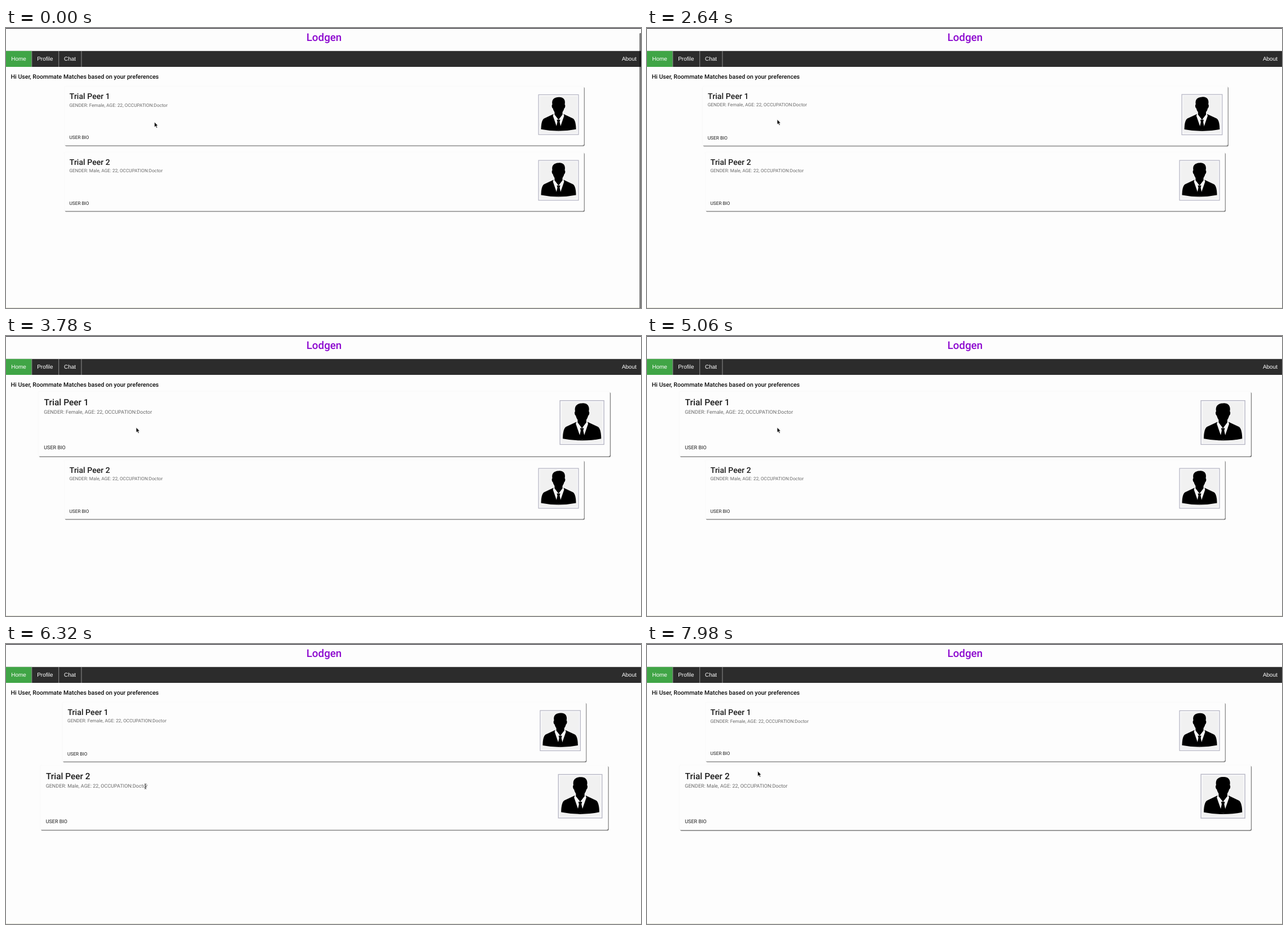
An HTML page for the animation above (8 s loop, 1128 px wide and 497 px high).

```html
<!DOCTYPE html>
<html lang="en">
<head>
<meta charset="utf-8">
<title>Roommate matches</title>
<style>
  html, body { margin: 0; width: 100%; height: 100%; overflow: hidden; background: #fdfdfd; }
  svg { display: block; width: 1128px; height: 497px; }
  text { font-family: Roboto, sans-serif; text-rendering: geometricPrecision; white-space: pre; }
  .brand { font-size: 18.8px; font-weight: 500; fill: #8c08cf; text-anchor: middle; }
  .nav text { font: 9.99px "Liberation Sans", Arial, sans-serif; fill: #fff; }
  .greeting { font-size: 10.58px; font-weight: 500; fill: #0c0c0c; }
  .name { font-size: 14.1px; font-weight: 500; fill: #1c1c1c; }
  .facts { font-size: 8.22px; fill: #6a6a6a; }
  .bio { font-size: 8.22px; fill: #1c1c1c; }
</style>
</head>
<body>
<svg viewBox="0 0 1128 497">
  <defs>
    <filter id="soft" x="-2%" y="-5%" width="104%" height="112%"><feGaussianBlur stdDeviation=".6"/></filter>
    <g id="avatar">
      <rect x="-35.5" y="-35.4" width="71" height="70.8" fill="#f8f8fa" stroke="#b4b4c2" stroke-width="1.2"/>
      <rect x="-33" y="-33" width="66" height="66" fill="#f1f1f1"/>
      <path d="M-9-1L-26 7C-30 10-31 19-31 26Q-16 29 0 29Q16 29 31 26C31 19 30 10 26 7L9-1Z"/>
      <path d="M-8-3L-10 2L-1 28H1L10 2L8-3L0 9Z" fill="#f6f6f6"/>
      <path d="M-7-8H7V0L0 9L-7 0Z"/>
      <path d="M-3 9H3L2 13L4.3 23L0 29L-4.3 23L-2 13Z"/>
      <path d="M-11-18C-13-28-6-31 0-31C8-32 13-27 11-18C12.5-17 12-12 10-11C8.5-5 5-1 0-1C-5-1-8.5-5-10-11C-12-12-12.5-17-11-18Z"/>
    </g>
  </defs>

  <rect width="1128" height="497" fill="#fdfdfd"/>
  <rect width="1128" height="1.2" fill="#2b2a30"/>
  <rect y="496" width="1128" height="1" fill="#e6e6d8"/>
  <text class="brand" x="565" y="23">Lodgen</text>

  <g class="nav">
    <rect y="40.8" width="1128" height="28.2" fill="#2c2c2c"/>
    <rect y="40.8" width="45.6" height="28.2" fill="#40a546"/>
    <path d="M45.8 40.8V69M93.7 40.8V69M134 40.8V69" stroke="#aaa" stroke-width=".8"/>
    <text x="9.2" y="58">Home</text>
    <text x="55.2" y="58">Profile</text>
    <text x="103" y="58">Chat</text>
    <text x="1093.9" y="58">About</text>
  </g>

  <text class="greeting" x="8.6" y="89.6">Hi User, Roommate Matches based on your preferences</text>
  <g id="cards"></g>
  <rect id="scrollbar" x="1125.2" y="9" width="4" height="490" rx="1.5" fill="#000"/>

  <path id="arrow" d="M0 0V9L2.1 7.1L3.7 10.5L5.2 9.8L3.7 6.5H6.3Z" fill="#000" stroke="#fff" stroke-width=".7"/>
  <path id="beam" d="M-1.7-4.4Q0-4.4 0-3.3Q0-4.4 1.7-4.4M0-3.3V3.3M-1.7 4.4Q0 4.4 0 3.3Q0 4.4 1.7 4.4M-1 1H1" fill="none" stroke="#222" stroke-width=".9"/>
</svg>

<script>
const LOOP = 8000;
const GROW = 21.43;
const ENTER_FIRST = 53.7;
const SWITCH = 121.7;
const CENTER_X = 565, CENTER_Y = 156, CARD_GAP = 116.6;
const $ = id => document.getElementById(id);

const people = [
  { name: "Trial Peer 1", gender: "Female" },
  { name: "Trial Peer 2", gender: "Male" },
];

// Step, x, y of the pointer's hot spot.
const pointerPath = [
  [0, 263.7, 167], [52.5, 263.7, 167], [55.5, 231.2, 162.3], [118.5, 231.2, 162.3],
  [124, 248.2, 248.8], [127, 248.2, 248.8], [133, 247.7, 252.7],
  [150, 247.7, 252.7], [158, 196.7, 225.8], [172, 196.7, 225.8],
];

const cardMarkup = ({ name, gender }) => `<g>
  <rect x="104.7" y="104.8" width="923.2" height="104.9" rx="2.6" fill="#777" filter="url(#soft)"/>
  <rect x="103.4" y="103.3" width="923.2" height="104.9" rx="2.4" fill="#fdfdfd" stroke="#f5f5f5" stroke-width=".5"/>
  <text class="name" x="112.8" y="126">${name}</text>
  <text class="facts" x="112.5" y="139.6">GENDER: ${gender}, AGE: 22, OCCUPATION:Doctor</text>
  <text class="bio" x="112.5" y="197.3">USER BIO</text>
  <use href="#avatar" x="981.5" y="153.8"/>
</g>`;
$("cards").innerHTML = people.map(cardMarkup).join("");
const cards = [...$("cards").children];

const clamp = v => Math.min(1, Math.max(0, v));
const smooth = v => v * v * (3 - 2 * v);
const bezier = (s, a, b) => 3 * (1 - s) ** 2 * s * a + 3 * (1 - s) * s * s * b + s ** 3;

// CSS "ease", solved by bisection.
function ease(x) {
  if (x <= 0 || x >= 1) return clamp(x);
  let low = 0, high = 1;
  for (let i = 0; i < 24; i++) {
    const mid = (low + high) / 2;
    if (bezier(mid, 0.25, 0.25) < x) low = mid; else high = mid;
  }
  return bezier(low, 0.1, 1);
}

// Three steps per 140 ms, at 0, 20 and 120 ms.
function stepAt(ms) {
  const phase = ms % 140;
  return 3 * Math.floor(ms / 140) + (phase >= 120 ? 2 : phase >= 20 ? 1 : 0);
}

function pointerAt(step) {
  const i = pointerPath.findIndex(p => p[0] > step);
  const [n0, x0, y0] = pointerPath[i - 1], [n1, x1, y1] = pointerPath[i];
  const k = smooth((step - n0) / (n1 - n0));
  return [x0 + (x1 - x0) * k, y0 + (y1 - y0) * k];
}

function draw(ms) {
  const step = stepAt(ms);
  const progress = start => ease((step - start) / GROW);
  const hover = [progress(ENTER_FIRST) - progress(SWITCH), progress(SWITCH)];

  cards.forEach((card, i) => card.setAttribute("transform",
    `translate(${CENTER_X} ${CENTER_Y + i * CARD_GAP}) scale(${1 + 0.1 * hover[i]}) translate(${-CENTER_X} ${-CENTER_Y})`));

  $("scrollbar").setAttribute("opacity", 0.5 * (1 - clamp((step - 8) / 6)));

  const overText = step >= 124 && step < 152;
  const place = `translate(${pointerAt(step)})`;
  for (const [id, shown] of [["arrow", !overText], ["beam", overText]]) {
    $(id).setAttribute("transform", place);
    $(id).setAttribute("visibility", shown ? "visible" : "hidden");
  }
}

const begin = performance.now();
function tick() {
  draw((performance.now() - begin) % LOOP);
  requestAnimationFrame(tick);
}
tick();
</script>
</body>
</html>
```
